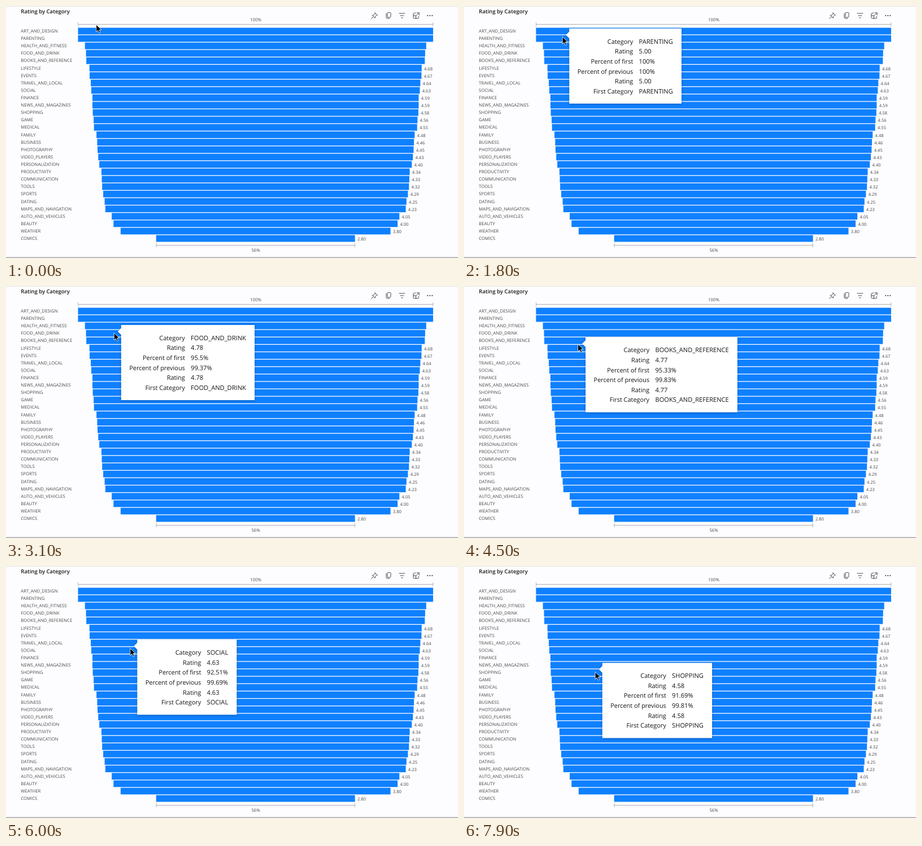
An HTML page that plays this animation: 800x446 px, repeating every 8 s.

```html
<!DOCTYPE html>
<html lang="en">
<head>
<meta charset="utf-8">
<title>Rating by Category</title>
<style>
  html, body { margin: 0; width: 100%; height: 100%; overflow: hidden; background: #fdfcfe; }
  svg { display: block; width: 800px; height: 446px; }
  text { font-family: "Open Sans", "Noto Sans", sans-serif; font-size: 7.75px; fill: #4a4948; text-rendering: geometricPrecision; }
  .title { font-size: 9.55px; font-weight: 600; fill: #1c1b1a; }
  .value { font-size: 7.6px; }
  .mid { text-anchor: middle; }
  .bracket { fill: none; stroke: #b0b0b2; }
  .icons { fill: none; stroke: #4a4948; stroke-linecap: round; stroke-linejoin: round; }
  #tip text { font-size: 11.1px; fill: #161514; }
  #tip .key { font-size: 10.95px; text-anchor: end; }
  #tip { filter: drop-shadow(0 1px 2px rgba(0, 0, 0, .3)); }
</style>
</head>
<body>
<svg viewBox="0 0 800 446">
  <rect width="800" height="446" fill="#fdfcfe"/>
  <rect width="800" height="1" fill="#e4e3e5"/>
  <rect y="444.5" width="800" height="1.5" fill="#a3a3a5"/>
  <text class="title" x="26.3" y="13.4">Rating by Category</text>
  <g class="icons">
    <path d="M653 12l4.2 4.2-1.5.5-2 2-.5 2.6-4.8-4.8 2.6-.5 2-2zM650.5 18.7l-3.8 3.6"/>
    <rect x="675" y="11.5" width="6" height="8.5" rx="1.3"/>
    <path d="M673 13.5v6.5q0 2 2 2h4"/>
    <path d="M696 13h10M698 17h6M699.8 21h2.4"/>
    <path d="M725 12.5h-2.5q-1.5 0-1.5 1.5v6.5q0 1.5 1.5 1.5h6.5q1.5 0 1.5-1.5v-2M727 12h4.2v4.2M731 12.2l-5 5M721 17h4.5v5"/>
  </g>
  <path d="M746.3 17h0M750.3 17h0M754.3 17h0" stroke="#3b3a39" stroke-width="2.2" stroke-linecap="round"/>
  <text class="mid" x="442" y="27">100%</text>
  <text class="mid" x="442" y="435.3">56%</text>
  <g id="chart"></g>
  <g id="tip"></g>
  <path id="cursor" d="M0 0V12.8L3 10l2.1 4.7 2.2-1L5.2 9.2H9.3Z" stroke="#fff" stroke-width=".8"/>
</svg>
<script>
const rows = `ART_AND_DESIGN 5, PARENTING 5, HEALTH_AND_FITNESS 4.8052, FOOD_AND_DRINK 4.77502,
  BOOKS_AND_REFERENCE 4.7667, LIFESTYLE 4.678, EVENTS 4.6725, TRAVEL_AND_LOCAL 4.64, SOCIAL 4.6255,
  FINANCE 4.594, NEWS_AND_MAGAZINES 4.5931, SHOPPING 4.5845, GAME 4.56, MEDICAL 4.55, FAMILY 4.48,
  BUSINESS 4.46, PHOTOGRAPHY 4.45, VIDEO_PLAYERS 4.43, PERSONALIZATION 4.4, PRODUCTIVITY 4.34,
  COMMUNICATION 4.33, TOOLS 4.32, SPORTS 4.29, DATING 4.25, MAPS_AND_NAVIGATION 4.23,
  AUTO_AND_VEHICLES 4.05, BEAUTY 4, WEATHER 3.8, COMICS 2.8`
  .split(",").map(s => s.trim().split(" ")).map(([name, r]) => ({ name, r: +r }));

const TOP = 37.85, ROW = 13.11, CENTER = 441.7, FULL = 628.5;
const LOOP = 8000, STEP = 100, LAG = 120;

// The cursor rests at each height: arrive, leave, y
const stops = [
  [0, 600, 33], [1800, 1800, 54.5], [3050, 3150, 83], [3600, 4800, 103],
  [5300, 5300, 129], [6500, 6900, 157.5], [7900, LOOP, 187.5]
];

const $ = id => document.getElementById(id);
const chart = $("chart"), tip = $("tip"), cursor = $("cursor");

function add(parent, tag, attrs, text = "") {
  const el = document.createElementNS("http://www.w3.org/2000/svg", tag);
  for (const k in attrs) el.setAttribute(k, attrs[k]);
  el.textContent = text;
  return parent.appendChild(el);
}

function bracket(r, y) {
  const w = FULL * r / 5 - .5, x = CENTER - w / 2;
  add(chart, "path", { class: "bracket", d: `M${x} ${y - 3.5}v7m0-3.5h${w}m0-3.5v7` });
}

rows.forEach(({ name, r }, i) => {
  const y = TOP + (i + .5) * ROW, w = FULL * r / 5;
  add(chart, "text", { x: 26.3, y: y + 2.6 }, name);
  add(chart, "rect", { x: CENTER - w / 2, y: y - 5.9, width: w, height: 11.8, fill: "#0f80ff" });
  if (r < 4.7) add(chart, "text", { x: CENTER + w / 2 + 4.3, y: y + 3.6, class: "value" }, r.toFixed(2));
});
bracket(5, 32.5);
bracket(2.8, 423.5);

const box = add(tip, "path", { fill: "#fff" });
const values = ["Category", "Rating", "Percent of first", "Percent of previous", "Rating", "First Category"]
  .map((key, i) => {
    const y = 26.9 + i * 17.6;
    add(tip, "text", { x: 113, y, class: "key" }, key);
    return add(tip, "text", { x: 123.3, y });
  });

const percent = x => +(x * 100).toFixed(2) + "%";

function fillTip(i) {
  const { name, r } = rows[i], rating = r.toFixed(2), prev = i ? rows[i - 1].r : r;
  [name, rating, percent(r / 5), percent(r / prev), rating, name]
    .forEach((s, k) => values[k].textContent = s);
  const w = 138.5 + Math.max(...values.map(v => v.getComputedTextLength()));
  box.setAttribute("d", `M0 0H${w}V133H0V17.5l-6-6 6-6Z`);
}

// Position along a gently bending downward sweep
function cursorAt(t) {
  const n = stops.findLastIndex(s => s[0] <= t), [, leave, from] = stops[n];
  let y = from;
  if (t > leave) {
    const [arrive, , to] = stops[n + 1];
    y += (to - from) * (t - leave) / (arrive - leave);
  }
  const d = y - 33;
  return [159.7 + .707 * d - .00154 * d * d, y];
}

const move = (el, x, y) => el.setAttribute("transform", `translate(${x} ${y})`);

function draw(now) {
  const t = Math.floor(now % LOOP / STEP) * STEP;
  move(cursor, ...cursorAt(t));
  const [x, y] = cursorAt(Math.max(0, t - LAG));
  const row = Math.floor((y - TOP) / ROW);
  tip.setAttribute("visibility", row < 0 ? "hidden" : "visible");
  if (row >= 0) {
    move(tip, x + 13.5, y - 12.5);
    fillTip(row);
  }
  requestAnimationFrame(draw);
}
requestAnimationFrame(draw);
</script>
</body>
</html>
```
